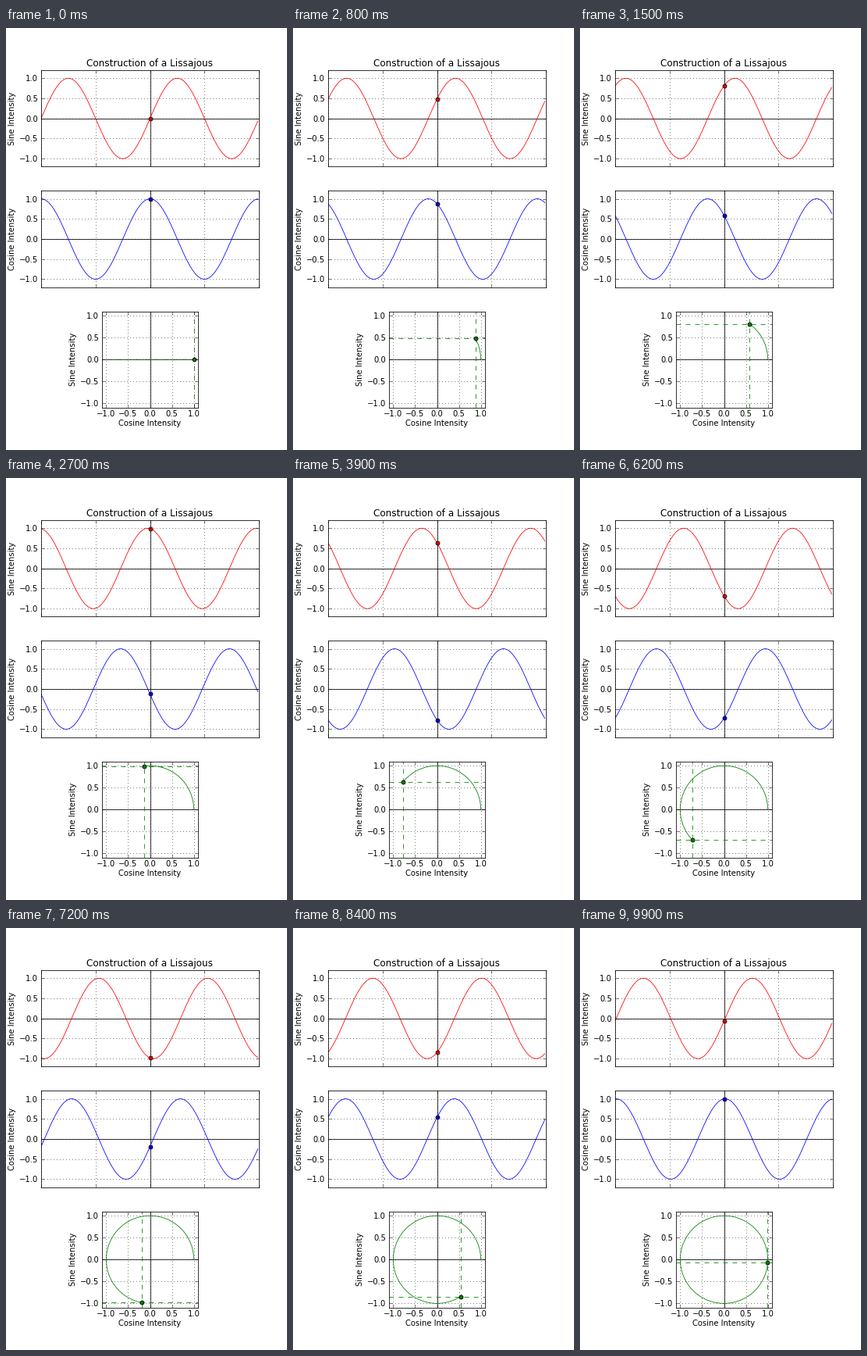
Recreate the animation shown at these times as a matplotlib script. Size 360x540 px, loop 10000 ms.

```python
import numpy as np
import matplotlib.pyplot as plt
from matplotlib.animation import FuncAnimation

FRAMES = 100
STEP = 2 * np.pi / FRAMES

plt.style.use("classic")
plt.rcParams.update({
    "font.family": "DejaVu Sans",
    "font.size": 10,
    "figure.dpi": 72,
    "savefig.dpi": 72,
    "figure.facecolor": "white",
    "axes.linewidth": 0.8,
    "lines.linewidth": 0.8,
    "lines.markersize": 5,
    "lines.markeredgewidth": 0.8,
    "xtick.major.pad": 3.5,
    "ytick.alignment": "center_baseline",
})

fig, (ax_sin, ax_cos, ax_xy) = plt.subplots(3, 1, figsize=(5, 7.5))
fig.subplots_adjust(left=0.125, right=0.9, bottom=0.1, top=0.9, hspace=0.25)

x = -2 * np.pi + STEP * np.arange(2 * FRAMES)
ticks = np.linspace(-1, 1, 5)


def setup(ax, ylabel, ylim):
    ax.set_ylim(-ylim, ylim)
    ax.set_yticks(ticks)
    ax.set_ylabel(ylabel, labelpad=4)
    ax.grid(True, linestyle=(0.5, (1, 3)))
    ax.axhline(0, color="k")
    ax.axvline(0, color="k")


def wave_axes(ax, ylabel, color):
    setup(ax, ylabel, 1.2)
    ax.set_xlim(-2 * np.pi, 2 * np.pi)
    ax.set_xticks(np.pi * np.arange(-2, 3))
    ax.set_xticklabels([])
    curve, = ax.plot([], [], color=color)
    dot, = ax.plot([], [], "o", color=color)
    return curve, dot


sin_curve, sin_dot = wave_axes(ax_sin, "Sine Intensity", "r")
cos_curve, cos_dot = wave_axes(ax_cos, "Cosine Intensity", "b")
ax_sin.set_title("Construction of a Lissajous", x=0.497)

setup(ax_xy, "Sine Intensity", 1.1)
ax_xy.set_xlim(-1.1, 1.1)
ax_xy.set_xticks(ticks)
ax_xy.set_xlabel("Cosine Intensity", labelpad=2)
ax_xy.set_aspect("equal", adjustable="box")
trail, = ax_xy.plot([], [], color="g")
hline = ax_xy.axhline(0, color="g", ls="--")
vline = ax_xy.axvline(1, color="g", ls="--")
xy_dot, = ax_xy.plot([], [], "o", color="g")


def update(i):
    phase = i * STEP
    s, c = np.sin(phase), np.cos(phase)
    sin_curve.set_data(x, np.sin(x + phase))
    cos_curve.set_data(x, np.cos(x + phase))
    sin_dot.set_data([0], [s])
    cos_dot.set_data([0], [c])

    past = STEP * np.arange(i + 1)
    trail.set_data(np.cos(past), np.sin(past))
    hline.set_ydata([s, s])
    vline.set_xdata([c, c])
    xy_dot.set_data([c], [s])
    return sin_curve, cos_curve, sin_dot, cos_dot, trail, hline, vline, xy_dot


anim = FuncAnimation(fig, update, frames=FRAMES, interval=100, repeat=True,
                     repeat_delay=0, blit=False)
plt.show()
```
